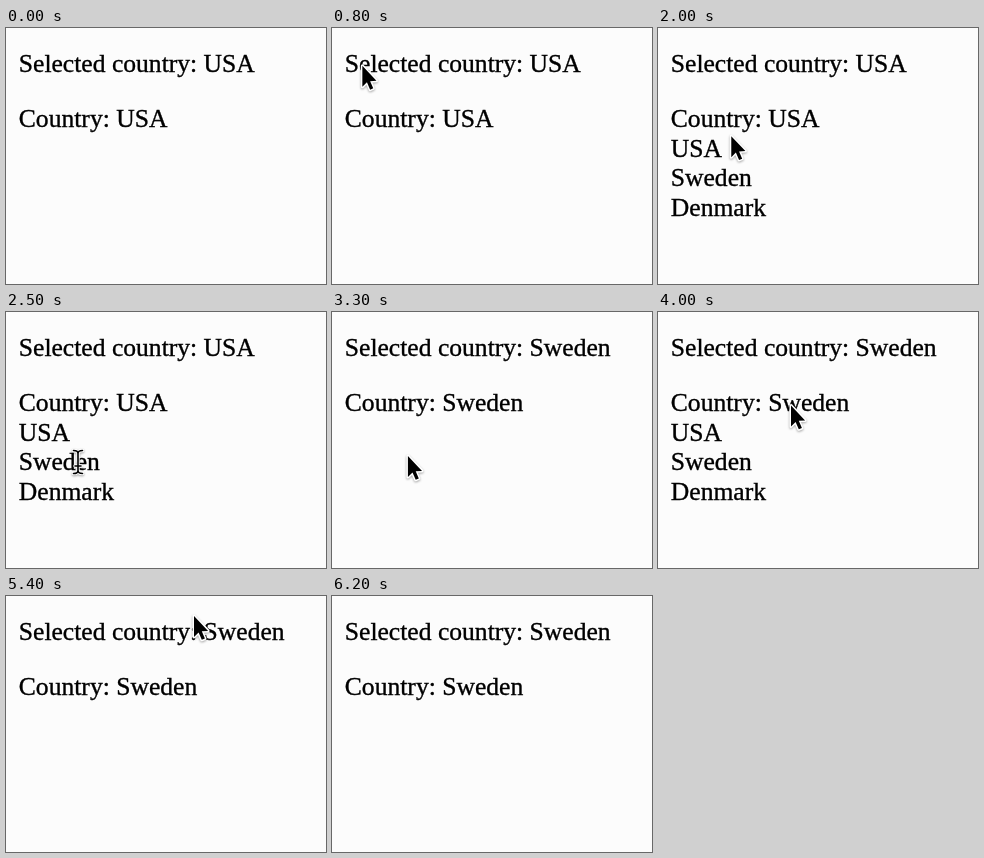
Recreate the animation shown at these times as an HTML page. Size 320 by 256 pixels, loop 7.2 s.

```html
<!DOCTYPE html>
<html lang="en">
<head>
<meta charset="utf-8">
<title>Country dropdown</title>
<style>
  html, body { margin: 0; width: 100%; height: 100%; overflow: hidden; background: #fcfcfc; }
  svg { display: block; width: 320px; height: 256px; }
  text { font: 25.6px "Liberation Serif", Times, serif; stroke: #000; stroke-width: .35; }
  #pointer { filter: drop-shadow(0 1.5px 1.2px rgba(0, 0, 0, .35)); }
  #arrow { stroke: #fff; stroke-width: 3; stroke-linejoin: round; paint-order: stroke; }
  #beam { fill: none; stroke-linecap: round; }
</style>
</head>
<body>
<svg viewBox="0 0 320 256">
  <defs>
    <path id="stem" d="M-4.5-11.5Q0-11.5 0-8.5Q0-11.5 4.5-11.5M0-8.5V8.5M-4.5 11.5Q0 11.5 0 8.5Q0 11.5 4.5 11.5M-3 4H3"/>
  </defs>
  <text x="12.8" y="44.3">Selected country: <tspan class="value"></tspan></text>
  <text x="12.8" y="99.3">Country: <tspan class="value"></tspan></text>
  <g id="menu">
    <text x="12.8" y="128.8">USA</text>
    <text x="12.8" y="158.3">Sweden</text>
    <text x="12.8" y="187.8">Denmark</text>
  </g>
  <g id="pointer">
    <path id="arrow" d="M0 0V21L4.6 16.4 7.8 23.8 10.9 22.5 7.8 15.3 14.1 14.9Z"/>
    <g id="beam">
      <use href="#stem" stroke="#fff" stroke-width="3.4"/>
      <use href="#stem" stroke="#000" stroke-width="1.6"/>
    </g>
  </g>
</svg>
<script>
const LOOP = 7200, STEP = 100;
const $ = id => document.getElementById(id);
const values = document.querySelectorAll('.value');

// Each move bends from the previous end towards `via` and stops at `to`.
const origin = [-100, -13];
const moves = [
  { start: 800, steps: 6, via: [345, 160], to: [142.5, 88] },
  { start: 1900, steps: 7, via: [-13, 125], to: [72, 150] },
  { start: 3300, steps: 6, via: [80, 134], to: [133, 93.5] },
  { start: 4400, steps: 8, via: [221, 88], to: [188, 20] },
  { start: 6100, steps: 1, via: [183, 18], to: [178, 16] }
];
const between = (t, a, b) => t >= a && t < b;
const show = (el, on) => el.style.display = on ? '' : 'none';
const bend = (a, b, c, p) => (1 - p) ** 2 * a + 2 * p * (1 - p) * b + p * p * c;

function pointerAt(t) {
  let from = origin;
  for (const { start, steps, via, to } of moves) {
    if (t < start) break;
    const p = Math.min(1, ((t - start) / STEP + 1) / steps);
    from = from.map((v, i) => bend(v, via[i], to[i], p));
  }
  return from;
}

function draw() {
  const t = Math.floor(performance.now() % LOOP / STEP) * STEP;
  const overText = between(t, 2100, 2700);
  values.forEach(el => el.textContent = t < 2700 ? 'USA' : 'Sweden');
  show($('menu'), between(t, 1500, 2700) || between(t, 4000, 5400));
  show($('pointer'), between(t, 800, 6200));
  show($('arrow'), !overText);
  show($('beam'), overText);
  $('pointer').setAttribute('transform', `translate(${pointerAt(t)})`);
  requestAnimationFrame(draw);
}
draw();
</script>
</body>
</html>
```
